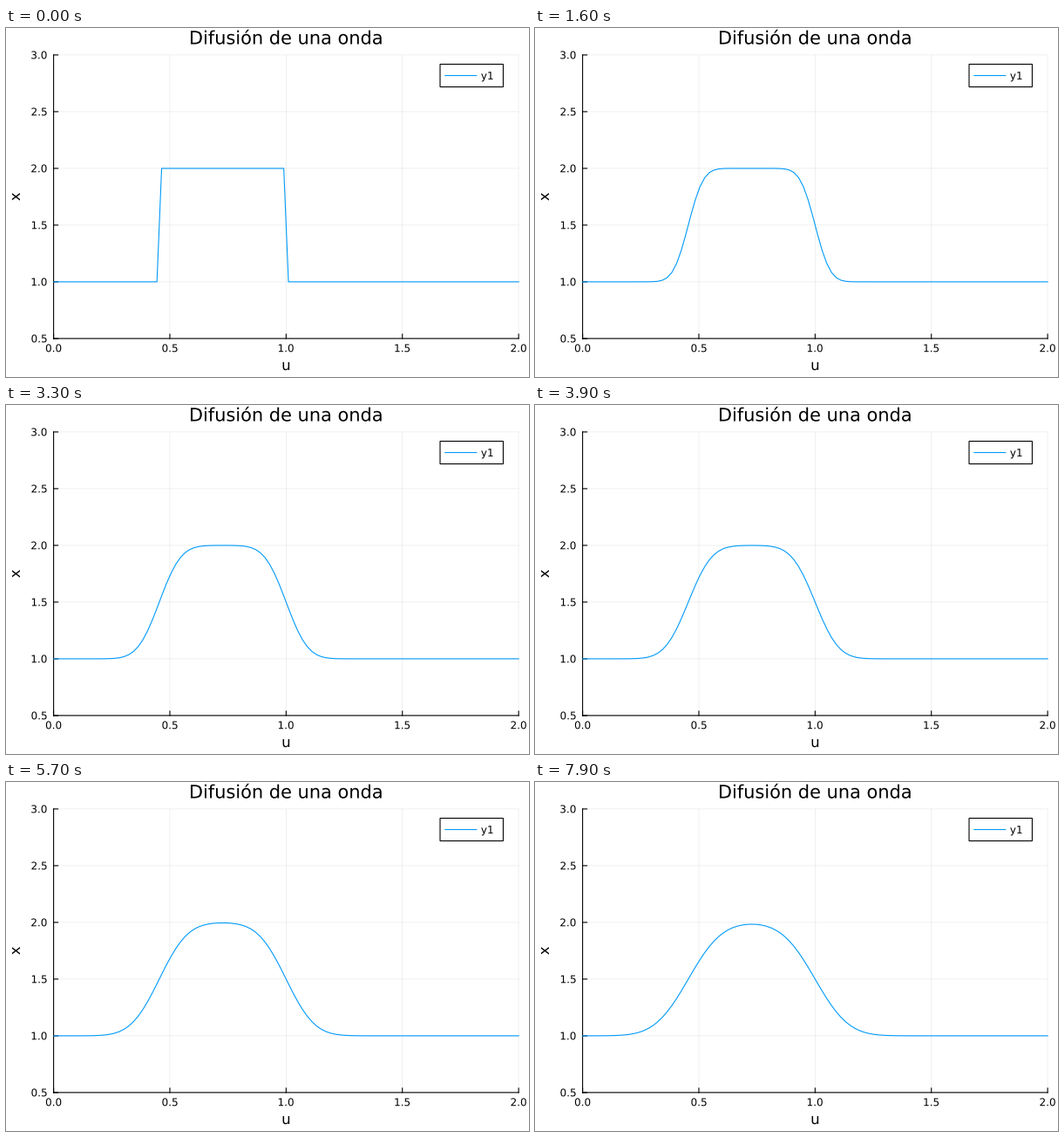
Animation, 600 px wide and 400 px high, one loop 8000 ms. Source, as a matplotlib script:

```python
import numpy as np
import matplotlib.pyplot as plt
from matplotlib.animation import FuncAnimation
from matplotlib.patches import PathPatch, Rectangle
from matplotlib.textpath import TextPath
from matplotlib.transforms import Affine2D

plt.rcParams["font.family"] = "DejaVu Sans"

W, H, DPI = 600, 400, 100
PT = 72 / DPI                      # points per pixel
LEFT, RIGHT, TOP, BOTTOM = 54.6, 588.1, 30.9, 355.9
BLUE = "#009AFA"
FRAMES, INTERVAL = 80, 100
POINTS, RATE = 100, 0.2            # grid size, nu * dt / dx**2


def px(x):
    return LEFT + (RIGHT - LEFT) * np.asarray(x) / 2


def py(y):
    return BOTTOM - (BOTTOM - TOP) * (np.asarray(y) - 0.5) / 2.5


fig = plt.figure(figsize=(W / DPI, H / DPI), dpi=DPI, facecolor="white")
ax = fig.add_axes([0, 0, 1, 1])
ax.set_xlim(0, W)
ax.set_ylim(H, 0)
ax.axis("off")


def line(xs, ys, color="black", width=1.1, **kw):
    return ax.plot(xs, ys, color=color, lw=width * PT, snap=False, **kw)[0]


def label(x, y, text, size, align=0.5, angle=0):
    """Unhinted text on baseline point (x, y); align 0 = left, 1 = right."""
    path = TextPath((0, 0), text, size=size)
    box = path.get_extents()
    shift = box.x0 + align * box.width
    place = Affine2D().translate(-shift, 0).scale(1, -1)
    place.rotate_deg(-angle).translate(x, y)
    ax.add_patch(PathPatch(place.transform_path(path), fc="black", lw=0,
                           snap=False, zorder=7))


def diffuse(u):
    """One explicit step of the heat equation with fixed ends."""
    new = u.copy()
    new[1:-1] += RATE * (u[2:] - 2 * u[1:-1] + u[:-2])
    return new


# Grid, ticks and tick labels
for v in np.arange(0, 2.01, 0.5):
    x = px(v)
    line([x, x], [TOP, BOTTOM], alpha=0.1, width=0.6, zorder=1)
    line([x, x], [BOTTOM, BOTTOM - 5], zorder=3)
    label(x, 371.2, f"{v:.1f}", 12)
for v in np.arange(0.5, 3.01, 0.5):
    y = py(v)
    line([LEFT, RIGHT], [y, y], alpha=0.1, width=0.6, zorder=1)
    line([LEFT, LEFT + 5], [y, y], zorder=3)
    label(46.6, y + 4.4, f"{v:.1f}", 12, align=1)

line([LEFT, LEFT], [TOP, BOTTOM], zorder=3)
line([LEFT, RIGHT], [BOTTOM, BOTTOM], zorder=3)

# Titles
mid_x, mid_y = (LEFT + RIGHT) / 2, (TOP + BOTTOM) / 2
label(mid_x, 18.5, "Difusión de una onda", 20.9)
label(mid_x, 392, "u", 16.5)
label(16, mid_y, "x", 16.5, angle=90)

# Legend
ax.add_patch(Rectangle((498, 41.5), 72.4, 26, fc="white", ec="black",
                       lw=1.1 * PT, snap=False, zorder=5))
line([503.8, 539.8], [54.5, 54.5], BLUE, zorder=6)
label(545.2, 58.9, "y1", 12, align=0)

# Wave at every time step
grid = np.linspace(0, 2, POINTS)
wave = np.where((grid > 0.45) & (grid < 1), 2.0, 1.0)
history = [wave]
for _ in range(FRAMES - 1):
    history.append(diffuse(history[-1]))

curve = line(px(grid), py(wave), BLUE, zorder=4)


def update(i):
    curve.set_ydata(py(history[i]))
    return (curve,)


anim = FuncAnimation(fig, update, frames=FRAMES, interval=INTERVAL,
                     repeat=True, repeat_delay=0)
plt.show()
```
